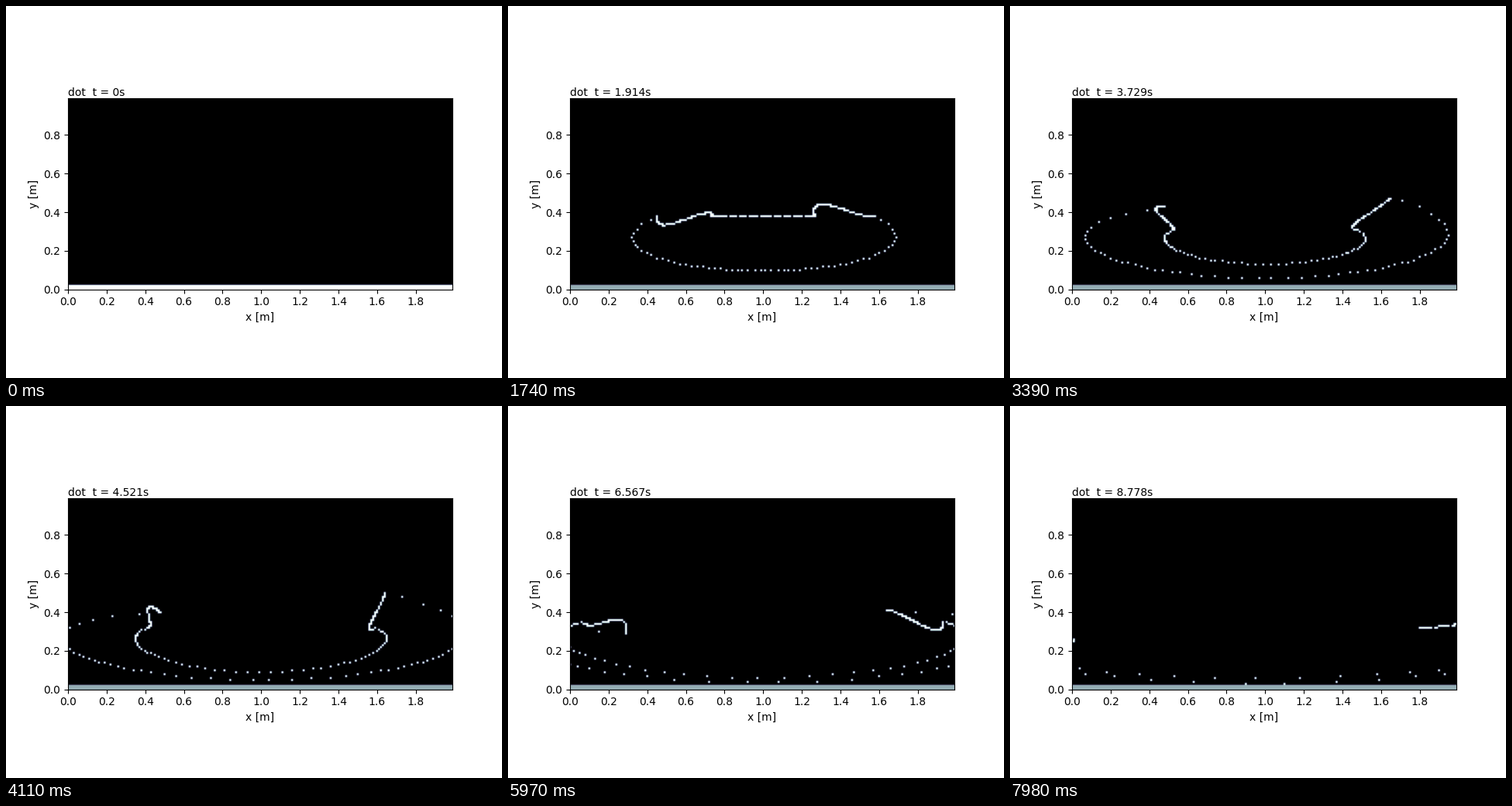
Write a matplotlib script that moves like this. It is 640 px wide and 480 px high and loops after 8000 ms.

```python
import numpy as np
import matplotlib.pyplot as plt
from matplotlib.animation import FuncAnimation

plt.rcParams["font.family"] = "DejaVu Sans"

NX, NY = 200, 100          # grid nodes, 0.01 m apart
FRAMES, LOOP = 267, 8000
DT = 0.033                 # simulated seconds per frame
FLOOR_ROWS = 3
FLOOR, DOT = 2, 3
CENTRE = 100
FALL = 0.957               # time in which the square turns into a blob

# Paths of the two lower corners: distance from the centre line and height.
TIMES = [0.96, 1.91, 2.97, 4.52, 6.57, 8.78]
LEFT = dict(x=[49, 55, 52, 52, 71, 99], y=[29, 38, 45, 40, 29, 26],
            lobes=(1, 0.3), shift=0.2)
RIGHT = dict(x=[48, 58, 65, 64, 64, 80], y=[28, 38, 45, 50, 41, 32],
             lobes=(0.2, 1), shift=0.8)

MARKER = np.arange(30)
SIDE = np.arange(60) / 60


def smooth(x):
    x = np.clip(x, 0, 1)
    return x * x * (3 - 2 * x)


def angle(s, start, mid, end):
    """Cubic with the given slope at 0 and values at 0.5 and 1."""
    b = 8 * mid - 3 * start - end
    return start * s + b * s**2 + (end - start - b) * s**3


def arc(s, width, low, middle, start, mid, end, tip):
    """Elliptic arc from the centre line whose end is drawn to the tip."""
    def ellipse(s):
        a = angle(s, start, mid, end)
        return np.stack([width * np.sin(a),
                         middle - (middle - low) * np.cos(a)], axis=-1)

    return ellipse(s) + s[:, None]**8 * (tip - ellipse(1.0))


def square_half(shift):
    base = np.stack([MARKER + 0.35, np.full(30, 20)], axis=-1)
    side = np.stack([np.full(60, 30), 20 + 60 * SIDE], axis=-1)
    top = np.stack([MARKER + shift, np.full(30, 80)], axis=-1)
    return np.concatenate([base, side, top])


def blob_half(t, half):
    grow = smooth((t - 0.4) / 7.6)
    stretch = 1 + 4.8 * grow
    drop = 40 * np.exp(-(t / 1.68)**2)

    top_width = 10 + 8 * t + 0.95 * t**2
    top_low = 6 + 64 * np.exp(-(t / 2.35)**1.7)
    top_middle = 27.5 + drop
    lower = np.array([np.interp(t, TIMES, half["x"]),
                      np.interp(t, TIMES, half["y"])])
    upper = np.array([0.9 * top_width, top_middle + 8 * grow])

    base = arc((MARKER + 0.35) / 30,
               width=30 + 22 * t**0.8,
               low=3 + 16 * np.exp(-0.45 * t),
               middle=28 - 14 * np.exp(-0.9 * t),
               start=stretch,
               mid=1.25 - 0.95 * np.exp(-t / 3.2),
               end=2.65 - 1.5 * np.exp(-0.7 * t),
               tip=lower)
    top = arc((MARKER + half["shift"]) / 30, top_width, top_low, top_middle,
              start=0.77 * stretch, mid=0.6 + 0.9 * grow,
              end=1.55 + 0.5 * grow, tip=upper)

    # The side rolls up: a bend that turns steadily around the line.
    s = SIDE[:, None]
    turn = 0.65 * t - 2.1
    bend = 7.5 * np.array([np.cos(turn), np.sin(turn)])
    early, late = half["lobes"]
    lobe = 6.75 * s * (1 - s) * (early * (1 - s) - late * s)
    side = lower + s * (upper - lower) + lobe * bend
    return np.concatenate([base, side, top])


def outline(t):
    mix = min(t / FALL, 1)**1.2
    parts = []
    for sign, half in ((-1, LEFT), (1, RIGHT)):
        pts = ((1 - mix) * square_half(half["shift"])
               + mix * blob_half(max(t, FALL), half))
        parts.append(pts * (sign, 1) + (CENTRE, 0))
    return np.concatenate(parts)


def field(i):
    grid = np.zeros((NY, NX))
    grid[:FLOOR_ROWS] = FLOOR if i else DOT
    if i:
        x, y = np.floor(outline(i * DT) + 0.5).astype(int).T
        ok = (x >= 0) & (x < NX) & (y >= FLOOR_ROWS) & (y < NY)
        grid[y[ok], x[ok]] = DOT
    return grid


fig, ax = plt.subplots(figsize=(6.4, 4.8), dpi=100)
image = ax.imshow(field(0), cmap="bone", origin="lower", vmin=0, vmax=DOT,
                  extent=(-0.005, NX / 100 - 0.005, -0.005, NY / 100 - 0.005))
ax.set_xlim(0, (NX - 1) / 100)
ax.set_ylim(0, (NY - 1) / 100)
ax.set_xticks(np.arange(0, 1.9, 0.2))
ax.set_yticks(np.arange(0, 0.9, 0.2))
ax.set_xlabel("x [m]")
ax.set_ylabel("y [m]")
label = ax.text(0, 1.004, "")


def update(i):
    image.set_data(field(i))
    label.set_text(f"dot  t = {round(i * DT, 3):g}s")
    return image, label


anim = FuncAnimation(fig, update, frames=FRAMES, interval=LOOP / FRAMES,
                     init_func=lambda: update(0), repeat=True, repeat_delay=0)
plt.show()
```
